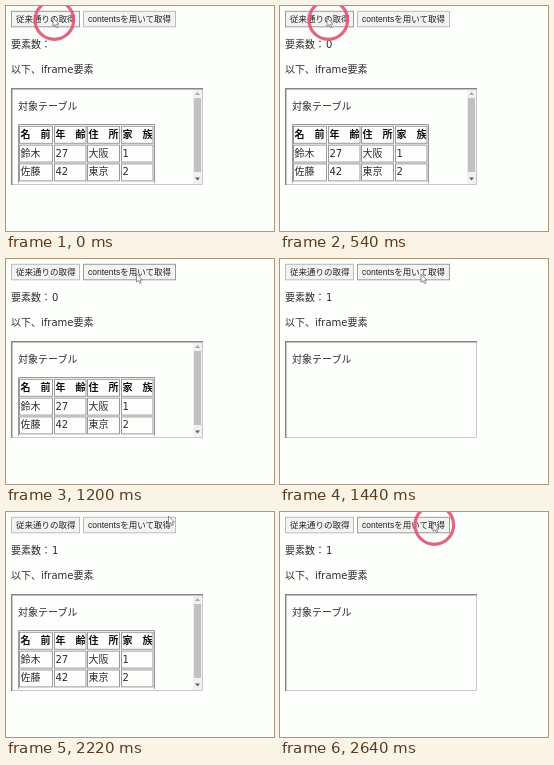
Write an HTML page that moves like this. It is 268 px wide and 225 px high and loops after 2700 ms.

```html
<!DOCTYPE html>
<html lang="ja">
<head>
<meta charset="utf-8">
<style>
html, body { margin: 0; width: 100%; height: 100%; overflow: hidden; background: #fdfffc; }
svg { display: block; width: 268px; height: 225px; }
text { font: 10px "DejaVu Sans", "Noto Sans CJK JP", "Noto Sans CJK", sans-serif; fill: #2c2c2c; white-space: pre; }
text.head { font-weight: bold; fill: #111; }
.btn text { font: 8.5px "Liberation Sans", "Noto Sans CJK JP", "Noto Sans CJK", sans-serif; fill: #222; }
.btn rect { fill: #f3f4f2; stroke: #bcbcbc; }
.btn.hover rect { stroke: #9c9c9c; }
.cell { fill: none; stroke: #999; }
</style>
</head>
<body>
<svg viewBox="0 0 268 225">
  <g class="btn" id="plain"><rect x="5.5" y="5.3" width="68" height="15.5"/><text x="10" y="16">従来通りの取得</text></g>
  <g class="btn" id="contents"><rect x="77.5" y="5.3" width="92" height="15.5"/><text x="82" y="16">contentsを用いて取得</text></g>
  <text x="5" y="42">要素数：</text>
  <text x="46" y="42" id="count"></text>
  <text x="5" y="67">以下、iframe要素</text>

  <path d="M5.5 178.5H196.5V82.5" fill="none" stroke="#c8c8c8"/>
  <path d="M5.7 179V82.8H197" fill="none" stroke="#868686" stroke-width="1.5"/>
  <text x="12" y="103.6">対象テーブル</text>

  <g id="table">
    <path d="M12.5 177V118.5H148.5V177" class="cell"/>
    <g id="cells"></g>
    <rect x="187" y="84" width="9" height="94" fill="#f1f1f1"/>
    <rect x="188" y="92" width="7" height="74" fill="#c1c1c1"/>
    <path d="M189 89l2.5-3 2.5 3z" fill="#a8a8a8"/>
    <path d="M189 171.5l2.5 3 2.5-3z" fill="#606060"/>
  </g>

  <circle id="ring" r="19.3" fill="none" stroke="#e05a73" stroke-width="3.2" opacity=".92"/>
  <path id="cursor" d="M0 0V8.3L2 6.6 3.4 9.6 4.8 9 3.5 6.1H6Z" fill="#fff" stroke="#707070" stroke-width=".8"/>
</svg>
<script>
const LOOP = 2700, STEP = 60;
const $ = id => document.getElementById(id);

const rows = [
  ['名　前', '年　齢', '住　所', '家　族'],
  ['鈴木', '27', '大阪', '1'],
  ['佐藤', '42', '東京', '2']
];
const cols = [[13.5, 33], [48.5, 31.5], [81.5, 32], [115.5, 31.5]];

// time, x, y of the pointer tip
const path = [
  [0, 47, 12], [600, 47, 12], [960, 88, 14], [1260, 141, 15],
  [1860, 141, 15], [2220, 162.5, 4], [2460, 153, 11], [LOOP, 153, 11]
];
const pressed = [[0, 600], [1260, 1440], [1680, 1860], [2460, LOOP]];
const hidden = [[1380, 1800], [2640, LOOP]];

$('cells').innerHTML = rows.map((row, r) => row.map((word, c) => {
  const [x, w] = cols[c], y = 120.3 + r * 18.8;
  return `<rect class="cell" x="${x}" y="${y}" width="${w}" height="17"/>` +
    `<text x="${x + 1}" y="${y + 11.5}"${r ? '' : ' class="head"'}>${word}</text>`;
}).join('')).join('');

const within = (spans, t) => spans.some(([a, b]) => t >= a && t < b);
const show = (id, on) => $(id).setAttribute('visibility', on ? 'visible' : 'hidden');
const move = (id, x, y) => $(id).setAttribute('transform', `translate(${x} ${y})`);

function pointer(t) {
  const i = path.findIndex(p => p[0] > t);
  const [t0, x0, y0] = path[i - 1], [t1, x1, y1] = path[i];
  const k = (t - t0) / (t1 - t0);
  return [x0 + (x1 - x0) * k, y0 + (y1 - y0) * k];
}

function draw(t) {
  const [x, y] = pointer(t);
  move('cursor', x, y);
  move('ring', x + 1.3, y + 2);
  show('ring', within(pressed, t));
  show('table', !within(hidden, t));
  $('count').textContent = t < 540 ? '' : t < 1380 ? '0' : '1';
  $('plain').classList.toggle('hover', y > 5 && x < 75);
  $('contents').classList.toggle('hover', y > 5 && x > 77);
}

const start = performance.now();
function tick() {
  const t = (performance.now() - start) % LOOP;
  draw(Math.floor(t / STEP) * STEP);
  requestAnimationFrame(tick);
}
tick();
</script>
</body>
</html>
```
